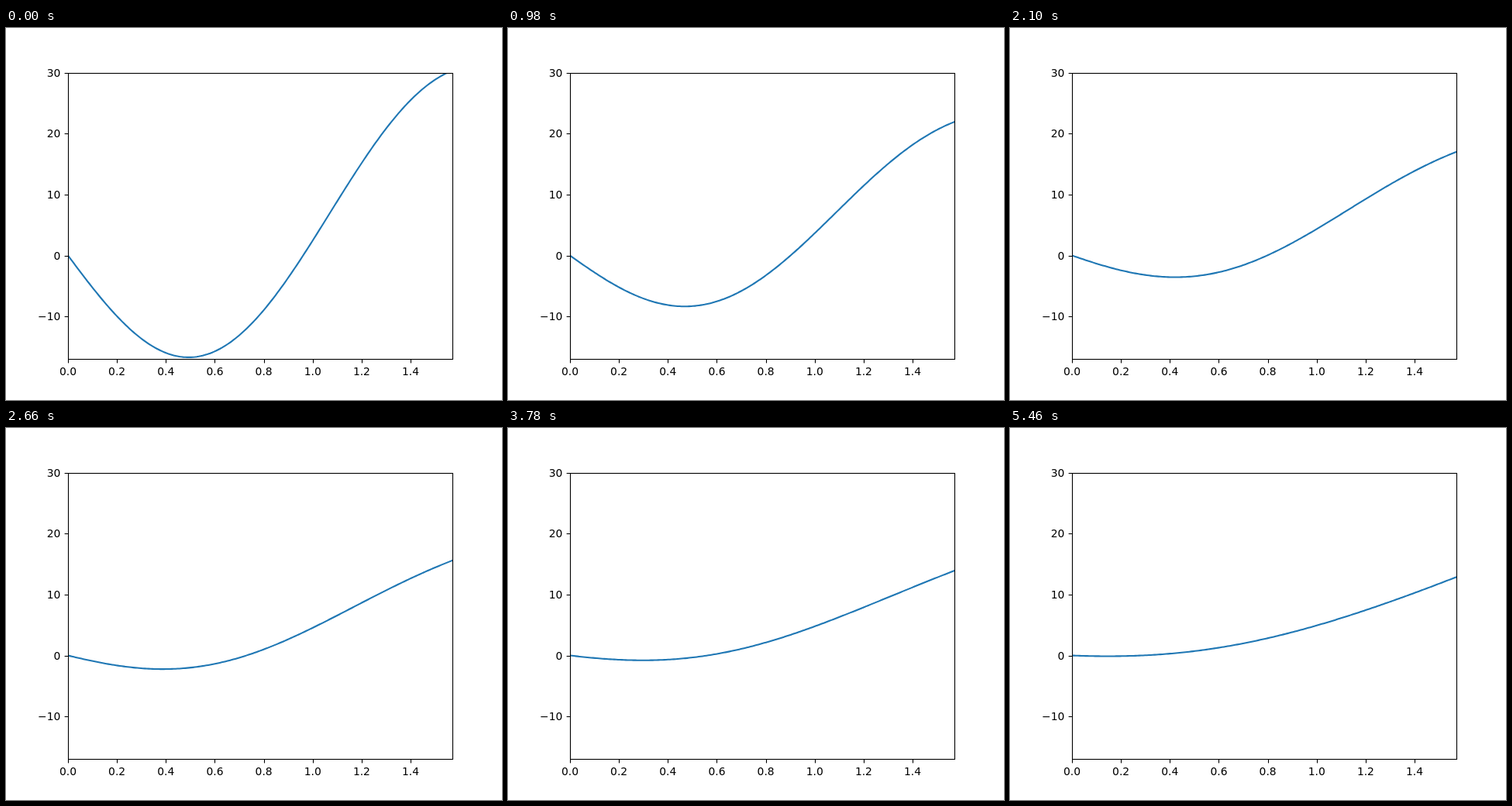
These frames come from a looping animation (640x480 px, 5.6 s). An HTML page:

```html
<!DOCTYPE html>
<html lang="en">
<head>
<meta charset="utf-8">
<title>Potential curve</title>
<style>
  html, body { margin: 0; width: 100%; height: 100%; overflow: hidden; background: #fff; }
  svg { display: block; }
  text { font: 13.889px "DejaVu Sans", sans-serif; fill: #000; }
  .axis { fill: none; stroke: #000; stroke-width: 1.11; }
  #curve { fill: none; stroke: #1f77b4; stroke-width: 2.083; stroke-linejoin: round; stroke-linecap: square; }
</style>
</head>
<body>
<svg id="plot" width="640" height="480" viewBox="0 0 640 480">
  <clipPath id="area"><rect x="80" y="58" width="496" height="369"/></clipPath>
  <g clip-path="url(#area)"><path id="curve"/></g>
  <rect class="axis" x="80.5" y="58.5" width="496" height="369"/>
</svg>
<script>
const plot = document.getElementById('plot');
const curve = document.getElementById('curve');
const STEP = 140, STEPS = 40, SAMPLES = 200;
const X_MAX = Math.PI / 2, Y_MIN = -17, Y_MAX = 30;

const toX = x => 80 + 496 * x / X_MAX;
const toY = y => 427.2 - 369.6 * (y - Y_MIN) / (Y_MAX - Y_MIN);

function add(tag, attrs, text = '') {
  const el = document.createElementNS('http://www.w3.org/2000/svg', tag);
  for (const key in attrs) el.setAttribute(key, attrs[key]);
  el.textContent = text;
  plot.append(el);
}

for (let i = 0; i < 8; i++) {
  const x = toX(i * 0.2);
  add('path', { class: 'axis', d: `M${Math.round(x) + 0.5} 427.5V432.4` });
  add('text', { x, y: 448, 'text-anchor': 'middle' }, (i * 0.2).toFixed(1));
}
for (let v = -10; v <= 30; v += 10) {
  const y = Math.round(toY(v));
  add('path', { class: 'axis', d: `M75.6 ${y + 0.5}H80.5` });
  add('text', { x: 70.3, y: y + 5, 'text-anchor': 'end' }, String(v).replace('-', '\u2212'));
}

// Parabola plus a sine term whose strength decays step by step
function draw(step) {
  const amp = 18 * Math.exp(-0.09 * step);
  let d = '';
  for (let i = 0; i <= SAMPLES; i++) {
    const x = X_MAX * i / SAMPLES;
    const y = 5 * x * x - amp * Math.sin(3 * x);
    d += (i ? 'L' : 'M') + toX(x).toFixed(2) + ' ' + toY(y).toFixed(2);
  }
  curve.setAttribute('d', d);
}

const start = performance.now();
let shown = 0;
draw(0);

function tick() {
  const step = Math.floor((performance.now() - start) / STEP) % STEPS;
  if (step !== shown) draw(shown = step);
  requestAnimationFrame(tick);
}
requestAnimationFrame(tick);
</script>
</body>
</html>
```
